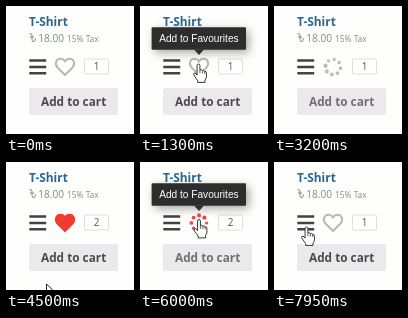
Write an HTML page that moves like this. It is 128 px wide and 128 px high and loops after 8000 ms.

```html
<!DOCTYPE html>
<html lang="en">
<head>
<meta charset="utf-8">
<title>Product card</title>
<style>
  html, body { margin: 0; width: 100%; height: 100%; overflow: hidden; background: #fefefd; }
  svg { display: block; width: 100vw; height: 100vh; }
  text { font-family: "Open Sans", "Noto Sans", sans-serif; }
  .bold { font-weight: 700; }
  .price { fill: #789472; }
  .hint { font-family: "Liberation Sans", Arial, sans-serif; }
  .shadow { filter: drop-shadow(3px 3px 5px rgba(0, 0, 0, .35)); }
</style>
</head>
<body>
<svg viewBox="0 0 128 128">
  <rect width="128" height="128" fill="#fefefd"/>
  <text class="bold" x="23" y="19.9" font-size="11.9" fill="#2a6690">T-Shirt</text>

  <path d="M23.5 28 Q25.5 26.5 26 29 V33.5 Q26 36 28 35.6 Q30 35 29.2 32.2 M23.8 31 H28" fill="none" stroke="#789472"/>
  <text class="price" x="32.3" y="35.6" font-size="10.1">18.00</text>
  <text class="price" x="61" y="35.6" font-size="8.4">15% Tax</text>

  <path d="M23.3 54.6 H40.2 M23.3 60.9 H40.2 M23.3 67.2 H40.2" stroke="#40433f" stroke-width="2.5"/>

  <path id="heart" stroke-width="2" stroke-linejoin="round"
    d="M59 69 L51.5 61.5 C48 57.5 50.5 52.8 54.5 52.8 C56.8 52.8 58.2 54 59 55.6 C59.8 54 61.2 52.8 63.5 52.8 C67.5 52.8 70 57.5 66.5 61.5 Z"/>
  <g id="spinner"></g>

  <rect x="78.5" y="53" width="24" height="15" rx="1" fill="#fff" stroke="#dededc"/>
  <text id="qty" x="90.5" y="64.2" font-size="10" text-anchor="middle" fill="#555">1</text>

  <rect id="button" x="23" y="82" width="89" height="27" rx="2"/>
  <text id="label" class="bold" x="35" y="99.8" font-size="11.8">Add to cart</text>

  <g id="tip">
    <rect class="shadow" x="11.6" y="21.2" width="94.4" height="22.6" rx="1" fill="#2d2d2d"/>
    <path d="M54 43.6 H64 L59 49 Z" fill="#2d2d2d"/>
    <text class="hint" x="58.9" y="35.8" font-size="10.15" text-anchor="middle" fill="#fff">Add to Favourites</text>
  </g>

  <g id="cursor" stroke="#222" stroke-linejoin="round">
    <path id="arrow" fill="#fff" d="M0 0 V16 L3.8 12.4 L6.4 18.5 L9 17.4 L6.4 11.5 H11.5 Z"/>
    <g id="hand" transform="scale(.88 .92)">
      <path fill="#fff" d="M-1.6 1.5 Q-1.5 0 0 0 Q1.5 0 1.6 1.5 V6.5 Q3.2 5.4 4.4 7.2 Q6 6.3 7 8 Q9 7.6 9 9.8 V14 Q8.6 16 7.4 17.5 V20 H-1 V18 Q-3 15.4 -5.4 11.8 Q-5.8 9.6 -4 9.8 L-1.6 12 Z"/>
      <path fill="none" stroke-width=".8" d="M1.6 6.5 V10 M4.4 7.2 V10.4 M7 8 V10.8"/>
    </g>
  </g>
</svg>
<script>
const LOOP = 8000;
const $ = id => document.getElementById(id);
const set = (id, attrs) => { for (const k in attrs) $(id).setAttribute(k, attrs[k]); };
const show = (id, on) => set(id, { visibility: on ? "inherit" : "hidden" });
const clamp = v => Math.min(1, Math.max(0, v));
const ramp = (t, from, to) => clamp((t - from) / (to - from));
const within = (t, from, to) => t >= from && t < to;
const smooth = p => p * p * (3 - 2 * p);
const easeOut = p => 1 - (1 - p) ** 3;

// Pointer trips: [time, x, y]
const trips = [
  [[400, 50, 106], [900, 58.5, 58], [1900, 58.5, 58], [2400, 58.5, 59], [2700, 50, 130]],
  [[4490, 40.5, 122], [5150, 59, 59], [5300, 59, 57.5], [6300, 59, 57.5], [6650, 52, 130]],
  [[7600, 46, 124], [7930, 32.5, 65], [8000, 32.5, 65]]
];
const tips = [
  { start: 950, shown: 1250, hide: 2750, gone: 2950 },
  { start: 5200, shown: 5550, hide: 6600, gone: 6800 }
];

const DOTS = 8;
for (let i = 0; i < DOTS; i++) {
  const a = i / DOTS * 2 * Math.PI;
  const dot = document.createElementNS("http://www.w3.org/2000/svg", "circle");
  dot.setAttribute("cx", 7.6 * Math.cos(a));
  dot.setAttribute("cy", 7.6 * Math.sin(a));
  dot.setAttribute("r", 1.6 + 0.5 * i / (DOTS - 1));
  $("spinner").append(dot);
}

function pointer(t) {
  const trip = trips.find(p => within(t, p[0][0], p[p.length - 1][0]));
  if (!trip) return null;
  const i = trip.findIndex(p => p[0] > t);
  const [t0, x0, y0] = trip[i - 1], [t1, x1, y1] = trip[i];
  const p = smooth(ramp(t, t0, t1));
  return { x: x0 + (x1 - x0) * p, y: y0 + (y1 - y0) * p };
}

function draw(t) {
  const adding = within(t, 1900, 3900);
  const removing = within(t, 6000, 7200);
  const busy = adding || removing;
  const liked = within(t, 3900, 7200);
  const red = "#f23b2f";

  show("heart", !busy);
  set("heart", { fill: liked ? red : "none", stroke: liked ? red : "#b9b9b7" });
  show("spinner", busy);
  set("spinner", {
    fill: removing ? "#f04a48" : "#bcbcbc",
    transform: `translate(59 61) rotate(${(t - (adding ? 1900 : 6000)) * 0.18})`
  });
  $("qty").textContent = liked ? 2 : 1;

  const c = pointer(t);
  const inBox = (x0, y0, x1, y1) => c && c.x > x0 && c.x < x1 && c.y > y0 && c.y < y1;
  const onButton = inBox(23, 82, 112, 109);
  const onIcon = inBox(23, 51, 69, 71);
  set("button", { fill: onButton && !busy ? "#dddbdd" : "#ebe9eb" });
  set("label", { fill: busy ? "#707070" : "#4a4b4b" });

  show("cursor", c);
  if (c) {
    const hand = onIcon || (onButton && !busy);
    set("cursor", { transform: `translate(${c.x} ${c.y})` });
    show("hand", hand);
    show("arrow", !hand);
  }

  const tip = tips.find(p => within(t, p.start, p.gone));
  show("tip", tip);
  if (tip) {
    const p = easeOut(ramp(t, tip.start, tip.shown));
    const out = ramp(t, tip.hide, tip.gone);
    set("tip", {
      opacity: p * (1 - out),
      transform: `translate(0 ${8.5 * (1 - p + out)})`
    });
  }
}

function frame() {
  draw(performance.now() % LOOP);
  requestAnimationFrame(frame);
}
frame();
</script>
</body>
</html>
```
